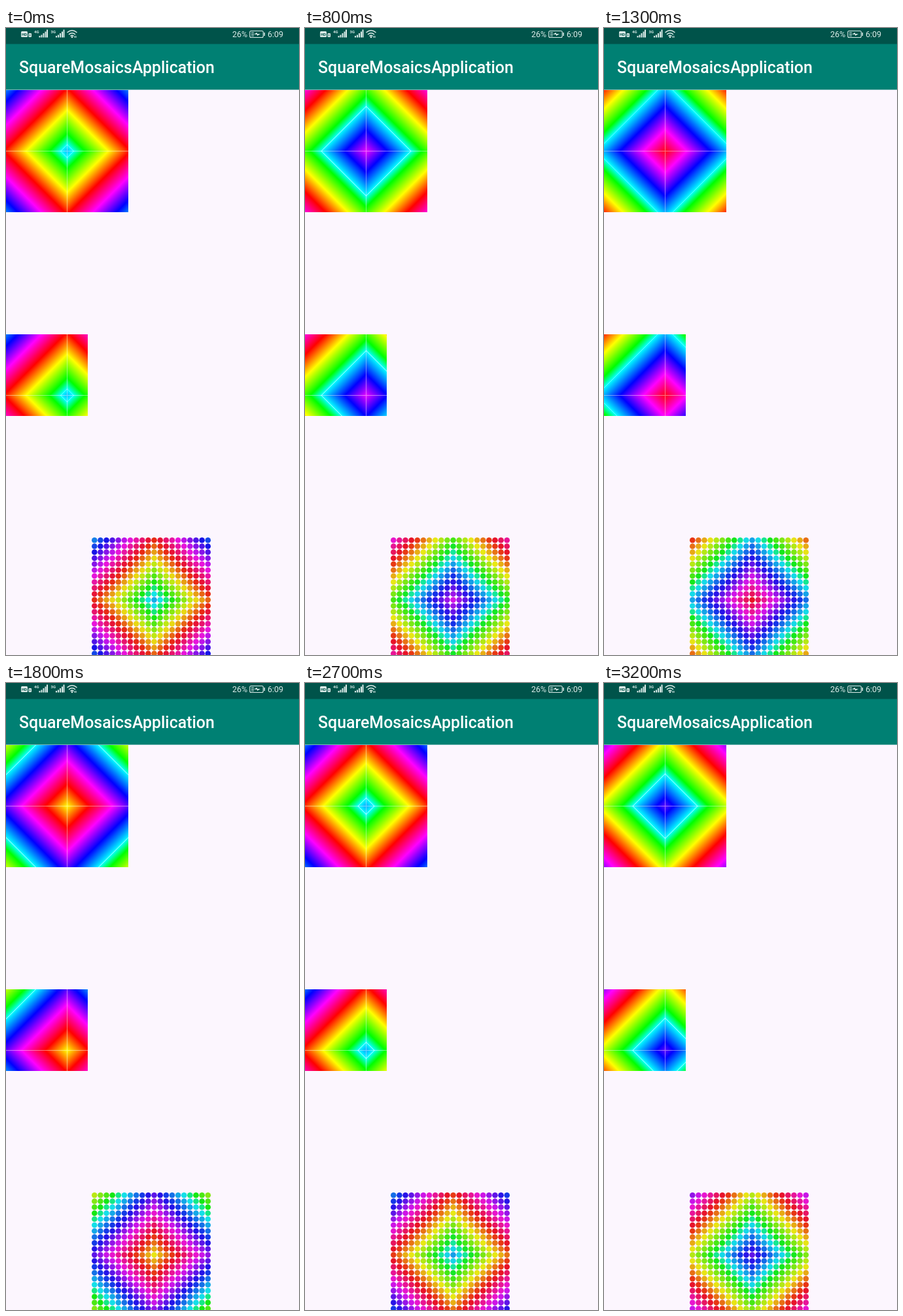
These frames come from a looping animation (448 by 960 pixels, 3300 ms). An HTML page with a canvas:

```html
<!DOCTYPE html>
<html lang="en">
<head>
<meta charset="utf-8">
<title>Square mosaics</title>
<style>
html, body { margin: 0; width: 100%; height: 100%; overflow: hidden; background: #fcf6fe; }
canvas, svg { position: absolute; left: 0; top: 0; display: block; }
text { font-family: Roboto, sans-serif; fill: #fff; }
.status text { font-size: 12.5px; fill: #dcebe8; }
.status .tiny { font-size: 6px; font-weight: 700; }
</style>
</head>
<body>
<canvas id="stage" width="448" height="960"></canvas>
<svg width="448" height="960" viewBox="0 0 448 960">
  <rect width="448" height="94.5" fill="#008073"/>
  <rect width="448" height="24.5" fill="#00534a"/>
  <text x="20" y="69.3" font-size="24.9" font-weight="500">SquareMosaicsApplication</text>
  <g class="status" fill="#dcebe8">
    <rect x="23" y="5" width="10" height="9" rx="1.5"/>
    <text class="tiny" x="24" y="11.7" style="fill:#00534a">HD</text>
    <rect x="34.5" y="8" width="4.5" height="6" rx="1"/>
    <path d="M36.7 9.5v3" stroke="#00534a"/>
    <text class="tiny" x="43" y="8">4G</text>
    <text class="tiny" x="68.5" y="8">3G</text>
    <g id="bars" fill="none" stroke="#dcebe8" stroke-width="2">
      <path d="M51.5 14.5v-2.5M54.5 14.5v-4M57.5 14.5v-6.5M60.5 14.5v-9M63 14.5v-12"/>
    </g>
    <use href="#bars" x="25.5"/>
    <g fill="none" stroke="#dcebe8" stroke-width="1.5">
      <path d="M93.5 7q7.5-6.5 15 0M96 10q5-4.5 10 0M98.5 12.5q2.5-2.2 5 0"/>
    </g>
    <circle cx="101" cy="14" r="1.3"/>
    <path d="M105 12v3m2-3v3" stroke="#dcebe8"/>
    <text x="346" y="14">26%</text>
    <rect x="372.8" y="4.5" width="20.5" height="10" rx="2" fill="none" stroke="#dcebe8" stroke-width="1.1"/>
    <path d="M394.5 7h1.5v5h-1.5zM375 6.5h4v1h-4zM375 9h4v1h-4zM375 11.5h4v1h-4zM379 9.5l5-2.5v2h5l-5 3v-2z"/>
    <text x="400" y="14">6:09</text>
  </g>
</svg>
<script>
const ctx = document.getElementById('stage').getContext('2d');
const SIZE = 187, MID = 93, LOOP = 3300, PERIOD = 195, DOTS = 20;
const START = 10, SPEED = 0.0732; // radius of the cyan ring in px, and px per ms
// Distances from the cyan ring at which each further 60 degrees of hue is reached.
const stops = [0, 17, 53, 87, 123, 159, PERIOD];
const tile = ctx.createImageData(SIZE, SIZE);

function colorAt(offset) {
  const s = (offset % PERIOD + PERIOD) % PERIOD;
  const i = stops.findIndex(p => p > s);
  const sextant = 9 - (i - 1 + (s - stops[i - 1]) / (stops[i] - stops[i - 1]));
  return [0, 4, 2].map(k =>
    255 * Math.min(1, Math.max(0, Math.abs((sextant + k) % 6 - 3) - 1)));
}

function paintTile(radius) {
  const ramp = Array.from({ length: 2 * SIZE }, (_, d) => {
    const ring = Math.abs((d - radius + PERIOD * 2.5) % PERIOD - PERIOD / 2) < 0.8;
    return colorAt(d - radius).map(c => ring ? c + (255 - c) * 0.4 : c);
  });
  for (let y = 0, n = 0; y < SIZE; y++) {
    for (let x = 0; x < SIZE; x++, n += 4) {
      const dx = Math.abs(x - MID), dy = Math.abs(y - MID);
      const white = dx && dy ? 0 : 0.45;
      ramp[dx + dy].forEach((c, k) => tile.data[n + k] = c + (255 - c) * white);
      tile.data[n + 3] = 255;
    }
  }
}

function paintDots(radius) {
  const step = 9.13, half = DOTS / 2;
  ctx.fillStyle = '#fcf6fe';
  ctx.fillRect(130, 779, 184, 181);
  for (let j = 0; j < DOTS; j++) {
    for (let i = 0; i < DOTS; i++) {
      const d = (Math.abs(i - half) + Math.abs(j - half)) * SIZE / DOTS;
      ctx.fillStyle = `rgb(${colorAt(d - radius).map(c => Math.round(20 + c * 0.83))})`;
      ctx.beginPath();
      ctx.arc(135.3 + i * step, 784.3 + j * step, 4.3, 0, 2 * Math.PI);
      ctx.fill();
    }
  }
}

let shown = -1;
function draw(now) {
  const t = Math.floor(now % LOOP / 100) * 100;
  if (t !== shown) {
    shown = t;
    const radius = START + SPEED * t;
    paintTile(radius);
    ctx.putImageData(tile, 0, 95);
    ctx.putImageData(tile, 0, 469, 0, 0, 125, 125);
    paintDots(radius);
  }
  requestAnimationFrame(draw);
}
draw(performance.now());
</script>
</body>
</html>
```
